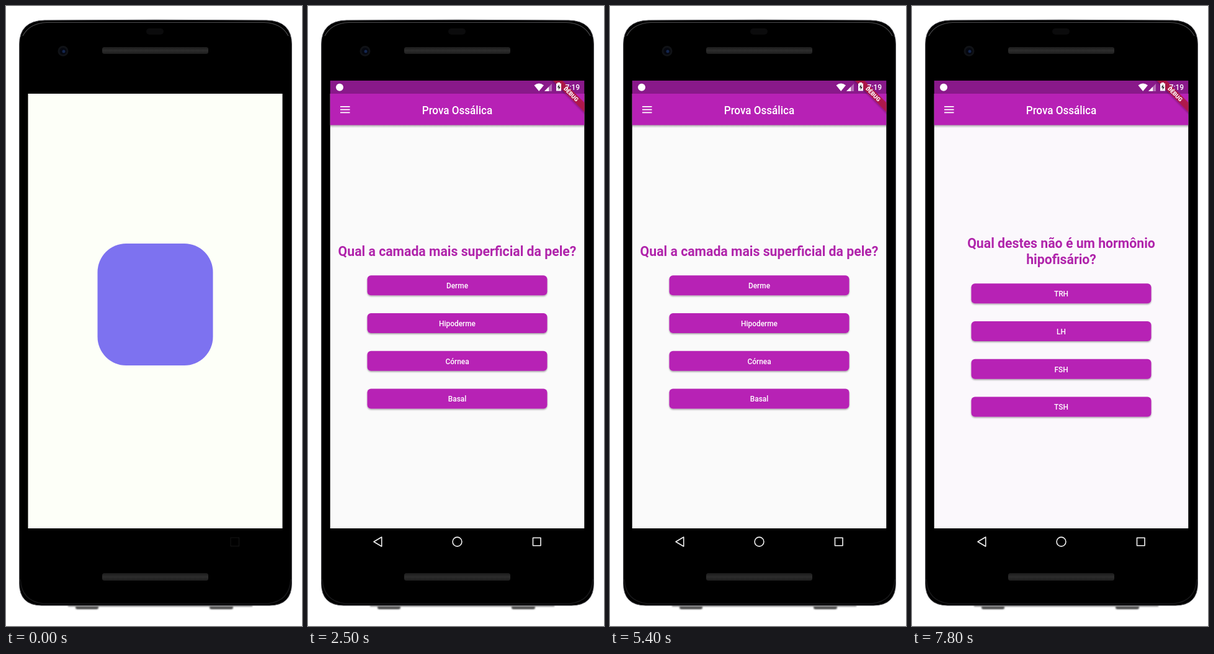
Animation of 477 by 997 pixels, one loop 8 s. Source, as an HTML page:

```html
<!DOCTYPE html>
<html lang="pt">
<head>
<meta charset="utf-8">
<title>Quiz</title>
<style>
  html, body { margin: 0; width: 100%; height: 100%; overflow: hidden; background: #fff; }
  svg { display: block; width: 477px; height: 997px; }
  text { font-family: Roboto, sans-serif; font-weight: 500; fill: #fff; }
  .ask { font-size: 22.3px; font-weight: 700; fill: #b024ab; text-anchor: middle; }
  .answer { font-size: 12.5px; text-anchor: middle; }
</style>
</head>
<body>
<svg viewBox="0 0 477 997" xmlns="http://www.w3.org/2000/svg">
  <defs>
    <linearGradient id="grille" x2="0" y2="1">
      <stop stop-color="#1b1b1b"/><stop offset=".5" stop-color="#2d2d2d"/><stop offset="1" stop-color="#1e1e1e"/>
    </linearGradient>
    <linearGradient id="barShade" x2="0" y2="1">
      <stop stop-color="#000" stop-opacity=".34"/><stop offset="1" stop-color="#000" stop-opacity="0"/>
    </linearGradient>
    <filter id="drop" x="-5%" y="-20%" width="110%" height="160%">
      <feDropShadow dx="0" dy="1.6" stdDeviation="1.2" flood-color="#000" flood-opacity=".35"/>
    </filter>
    <filter id="soft" x="-20%" y="-100%" width="140%" height="300%"><feGaussianBlur stdDeviation="1.3"/></filter>
    <clipPath id="view"><rect x="35.5" y="120" width="410" height="720"/></clipPath>
  </defs>

  <!-- phone -->
  <g filter="url(#soft)" fill="#444">
    <rect x="112" y="962" width="37" height="8" rx="3"/>
    <rect x="328" y="962" width="38" height="8" rx="3"/>
    <rect x="100" y="962" width="297" height="4" fill="#999"/>
  </g>
  <path d="M21.5 62Q21.5 24 62 23Q240 21.500 420 23Q460.500 24 460.500 62V928Q460.500 963.500 425 964H57Q21.500 963.500 21.500 928Z" fill="#000" stroke="#55555a" stroke-width="1"/>
  <path d="M27 48Q38 27.500 66 26.500H416Q444 27.500 455 48" fill="none" stroke="#4a4a4c" stroke-width="1.200"/>
  <path d="M23 922Q25 957 60 961H422Q457 957 459 922" fill="none" stroke="#19191b" stroke-width="1.500"/>
  <rect x="226" y="36" width="28" height="10" rx="5" fill="#0b0b0c"/>
  <rect x="155" y="66" width="171" height="11" rx="3.500" fill="url(#grille)"/>
  <rect x="155" y="912" width="171" height="12" rx="3.500" fill="url(#grille)"/>
  <circle cx="92" cy="72.500" r="8.500" fill="#101216"/>
  <circle cx="92" cy="72.500" r="5.500" fill="#05070f"/>
  <circle cx="93" cy="73" r="2.500" fill="#14264f"/>

  <!-- launch screen -->
  <g id="splash">
    <rect id="paper" x="35.500" y="141" width="410" height="699"/>
    <rect x="147.500" y="382" width="186" height="196" rx="46" fill="#7d72f0"/>
  </g>

  <!-- app -->
  <g id="app" clip-path="url(#view)">
    <rect id="page" x="35.500" y="141" width="410" height="699"/>
    <rect x="35.500" y="191" width="410" height="5" fill="url(#barShade)"/>
    <rect x="35.500" y="120" width="410" height="21.500" fill="#89198a"/>
    <rect x="35.500" y="141" width="410" height="50.500" fill="#b721b5"/>
    <path d="M52 161.800h15.500M52 166.600h15.500M52 171.400h15.500" stroke="#fff" stroke-width="1.800"/>
    <g id="heading"></g>
    <g id="quiz"></g>
    <g transform="translate(445.500 120) rotate(45)">
      <rect x="-50" y="25" width="100" height="10.700" fill="#b3153f" fill-opacity=".85" filter="url(#drop)"/>
      <text x="0" y="33.600" text-anchor="middle" style="font-size:9.100px;font-weight:900">DEBUG</text>
    </g>
  </g>

  <!-- system bars -->
  <g id="status" fill="#fff">
    <circle cx="51" cy="130.800" r="6"/>
    <path d="M364.500 127.500Q372.200 121.500 380 127.500L372.200 137Z"/>
    <path d="M381 137L393 125V137Z" opacity=".38"/>
    <path d="M381 137L388 130V137Z"/>
    <path d="M400 124.500h2v-1.500h4v1.500h2v12h-8Z"/>
    <path d="M404.800 126l-3 5h2v4l3-5h-2Z" fill="#333"/>
    <g id="clock"></g>
  </g>
  <g id="nav" fill="none" stroke="#f2f2f2" stroke-width="1.600" stroke-linejoin="round">
    <path d="M106 861.500L118.700 854V869Z"/>
    <circle cx="240.500" cy="861.500" r="7.400"/>
    <rect x="362.500" y="855.200" width="12.500" height="12.500"/>
  </g>
  <rect id="ghost" x="362" y="855" width="13.500" height="13.500" fill="none" stroke="#151515"/>
</svg>

<script>
const LOOP = 8000;
const ASPECT = 0.953; // the phone's display is slightly narrower than tall
const MID = 240.5;
const $ = id => document.getElementById(id);

const skin = { ask: ["Qual a camada mais superficial da pele?"],
  answers: ["Derme", "Hipoderme", "Córnea", "Basal"] };
const vessel = { ask: ["Qual vaso é responsável por levar", "sangue oxigenado ao corpo?"],
  answers: ["Artéria pulmonar", "Veia Cava", "Aorta", "Basal"] };
const hormone = { ask: ["Qual destes não é um hormônio", "hipofisário?"],
  answers: ["TRH", "LH", "FSH", "TSH"] };

const WHITE = "#fafafa", LILAC = "#fbf8fc";
const scenes = [
  { at: 0, paper: "#fdfff8" },
  { at: 1000, paper: "#fafcf5", bars: true },
  { at: 1600, quiz: skin, page: WHITE, bars: true },
  { at: 3100, quiz: vessel, page: LILAC, bars: true },
  { at: 3900, quiz: hormone, page: WHITE, bars: true },
  { at: 5100, quiz: skin, page: WHITE, bars: true },
  { at: 6000, quiz: vessel, page: LILAC, bars: true },
  { at: 7200, quiz: hormone, page: LILAC, bars: true }
];

const label = (x, y, str, attrs) =>
  `<text transform="translate(${x} ${y}) scale(${ASPECT} 1)" ${attrs}>${str}</text>`;

function button(str, y) {
  return `<rect x="95.5" y="${y}" width="290" height="32" rx="6" fill="#b721b5" filter="url(#drop)"/>` +
    label(MID, y + 20.8, str, 'class="answer"');
}

function drawQuiz({ ask, answers }) {
  const extra = (ask.length - 1) * 13;
  const lines = ask.map((s, i) => label(MID, 402 - extra + i * 26.1, s, 'class="ask"'));
  const buttons = answers.map((s, i) => button(s, 433.3 + extra + i * 60.75));
  return lines.concat(buttons).join("");
}

const show = (id, on) => $(id).setAttribute("display", on ? "inline" : "none");

let current;
function render(t) {
  const scene = scenes.findLast(s => t >= s.at);
  if (scene === current) return;
  current = scene;
  show("splash", !scene.quiz);
  show("app", scene.quiz);
  show("status", scene.bars);
  show("nav", scene.bars);
  show("ghost", !scene.bars);
  if (scene.quiz) {
    $("page").setAttribute("fill", scene.page);
    $("quiz").innerHTML = drawQuiz(scene.quiz);
  } else {
    $("paper").setAttribute("fill", scene.paper);
  }
}

$("heading").innerHTML = label(MID, 173.6, "Prova Ossálica", 'text-anchor="middle" font-size="17.9"');
$("clock").innerHTML = label(414.5, 135.3, "7:19", 'font-size="12.5"');

const start = performance.now();
function tick() {
  render((performance.now() - start) % LOOP);
  requestAnimationFrame(tick);
}
tick();
</script>
</body>
</html>
```
